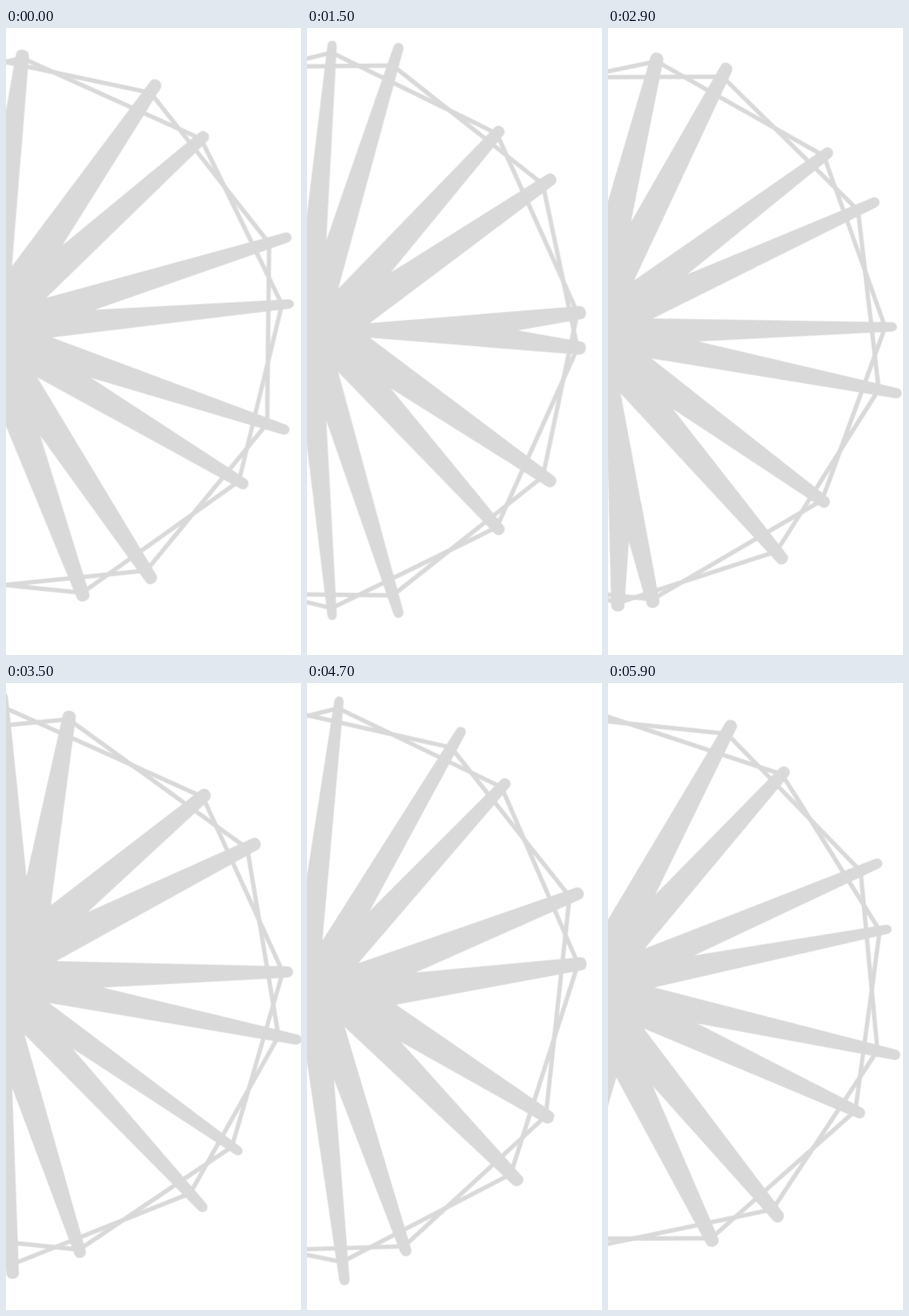
These frames come from a looping animation (338 px wide and 717 px high, 6 s). An HTML page:

```html
<!DOCTYPE html>
<html lang="en">
<head>
<meta charset="utf-8">
<title>Turning wheel</title>
<style>
  html, body { margin: 0; width: 100%; height: 100%; overflow: hidden; background: #fff; }
  svg { display: block; width: 338px; height: 717px; }
  #wheel { transform-origin: 0 0; }
</style>
</head>
<body>
<svg viewBox="0 0 338 717">
  <defs>
    <clipPath id="half"><rect x="-400" y="-0.4" width="800" height="400"/></clipPath>
    <g id="side">
      <path id="spokes" fill="#d9d9d9" clip-path="url(#half)"/>
      <path id="rim" fill="none" stroke="#d9d9d9" stroke-width="5" stroke-linejoin="round"/>
    </g>
  </defs>
  <g transform="translate(-1.5 345.8)">
    <g id="wheel">
      <use href="#side"/>
      <use href="#side" transform="scale(1 -1)"/>
    </g>
  </g>
</svg>
<script>
// Each spoke: angle in degrees and tip radius. The other half is a mirror image.
const SPOKES = [
  [3.7, 317], [31.6, 331], [45.8, 319], [71.8, 341], [84.7, 328],
  [109.5, 341], [122.7, 326], [149.4, 331], [163.5, 318]
];
const HUB = [0, -20];
const RIM = 319;

const polar = (deg, r) => {
  const a = deg * Math.PI / 180;
  return [r * Math.cos(a), r * Math.sin(a)];
};
const pt = p => p.map(v => v.toFixed(2)).join(' ');

// Tapered bar from the hub to a rounded tip; bars close to the mirror axis are thicker.
function spoke([deg, r]) {
  const tip = polar(deg, r);
  const dx = tip[0] - HUB[0], dy = tip[1] - HUB[1];
  const len = Math.hypot(dx, dy), ux = dx / len, uy = dy / len;
  const base = 16.4 + 6 * Math.abs(ux), end = 5.2 + 2.4 * Math.abs(ux);
  const at = (along, across) =>
    pt([HUB[0] + ux * along - uy * across, HUB[1] + uy * along + ux * across]);
  return `M${at(0, -base)}L${at(len - 2, -end)}` +
    `C${at(len + 7, -end)} ${at(len + 7, end)} ${at(len - 2, end)}L${at(0, base)}Z`;
}

// Closed ring through every second spoke, all the way round both halves.
function rim() {
  const ring = [...SPOKES, ...SPOKES.map(([deg, r]) => [-deg, r]).reverse()];
  const points = ring.filter((s, i) => i % 2 === 0)
    .map(([deg, r]) => polar(deg, Math.min(RIM, r - 5)));
  return 'M' + points.map(pt).join('L') + 'Z';
}

document.getElementById('spokes').setAttribute('d', SPOKES.map(spoke).join(''));
document.getElementById('rim').setAttribute('d', rim());

document.getElementById('wheel').animate(
  [{ transform: 'rotate(-90deg)' }, { transform: 'rotate(270deg)' }],
  { duration: 6000, iterations: Infinity, easing: 'steps(60, end)' }
);
</script>
</body>
</html>
```
